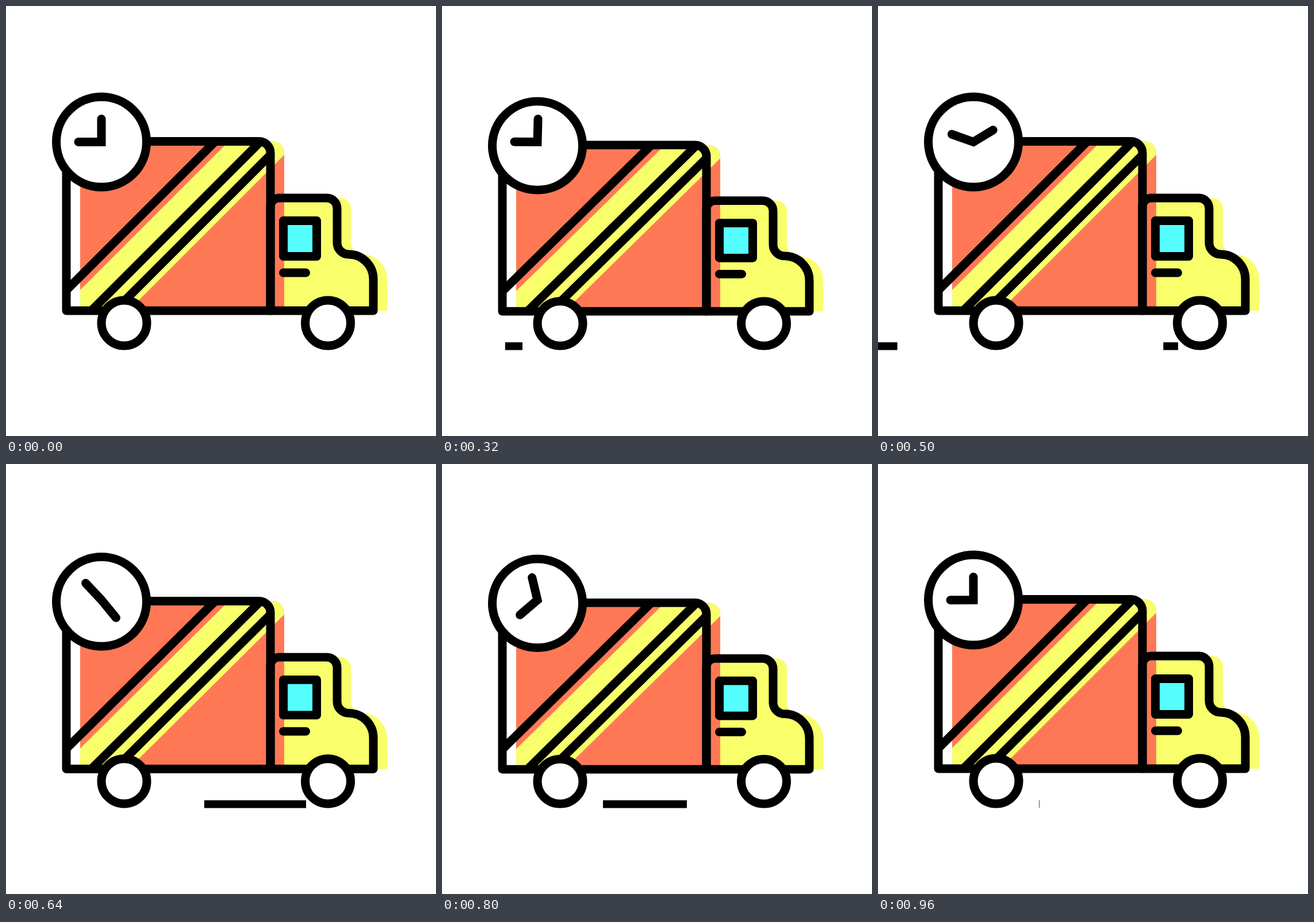
Animation, 748 px wide and 748 px high, one loop 980 ms. Source, as an HTML page:

```html
<!DOCTYPE html>
<html lang="en">
<head>
<meta charset="utf-8">
<title>Delivery truck</title>
<style>
  html, body { margin: 0; width: 100%; height: 100%; overflow: hidden; background: #fff; }
  svg { display: block; width: 100%; height: 100%; }
  .ink { fill: none; stroke: #000; stroke-width: 15; stroke-linejoin: round; }
  .round { stroke-linecap: round; }
  .white { fill: #fff; }
  .orange { fill: #ff7855; }
  .yellow { fill: #f8ff6b; }
  .cyan { fill: #55ffff; }
  #hands { stroke-linejoin: miter; }
</style>
</head>
<body>
<svg viewBox="0 0 748 748">
  <defs>
    <path id="box" d="M105 235.5H440A20 20 0 0 1 460 255.5V530H105Z"/>
    <path id="cab" d="M460 530V349A15 15 0 0 1 475 334H558A18 18 0 0 1 576 352V412A20 20 0 0 0 596 432A43 43 0 0 1 639 475V530Z"/>
    <clipPath id="boxClip"><use href="#box"/></clipPath>
  </defs>

  <rect id="dashBack" y="585" height="13.5"/>
  <rect id="dashMid" y="585" height="13.5"/>

  <g id="truck">
    <g transform="translate(24 0)">
      <use href="#box" class="orange"/>
      <path class="yellow" clip-path="url(#boxClip)" d="M399 200H519L189 530H69Z"/>
      <use href="#cab" class="yellow"/>
    </g>
    <path class="ink" d="M364 235.5L105 494.5M443 235.5L148.5 530M460 259L189 530"/>
    <use href="#box" class="ink"/>
    <use href="#cab" class="ink"/>
    <rect class="ink cyan" style="fill:#55ffff" x="482.5" y="373.5" width="58" height="62"/>
    <path class="ink round" d="M482.5 464H521.5"/>
    <g class="ink" style="fill:#fff">
      <circle cx="205.5" cy="551.5" r="39.5"/>
      <circle cx="560" cy="551.5" r="39.5"/>
      <circle cx="166" cy="236.5" r="78.5"/>
    </g>
  </g>
  <path id="hands" class="ink round"/>
</svg>
<script>
const LOOP = 980, TICK = 20, BOUNCE = 480, GROUND = 598.5;
const el = id => document.getElementById(id);
const truck = el('truck'), hands = el('hands');

const span = (t, from, to) => Math.min(1, Math.max(0, (t - from) / (to - from)));
const smooth = p => (1 - Math.cos(Math.PI * p)) / 2;
const soften = p => p * (1.3 - 0.3 * p);

// Grows leftwards from its right end, then shrinks into its left end.
function dash(node, t, right, length, start, half) {
  const head = right - length * soften(span(t, start, start + half));
  const tail = right - length * soften(span(t, start + half, start + 2 * half));
  node.setAttribute('x', head);
  node.setAttribute('width', tail - head);
}

// Slow squash, quick release.
function squash(t) {
  const p = t % BOUNCE;
  const depth = t < BOUNCE ? 8 : 7.3;
  return depth * smooth(p < 320 ? p / 320 : (BOUNCE - p) / 160);
}

function tip(deg) {
  const a = deg * Math.PI / 180;
  return `${166 + 40 * Math.sin(a)} ${236.5 - 40 * Math.cos(a)}`;
}

function draw(t) {
  const scale = 1 - squash(t) / (GROUND - 150);
  truck.setAttribute('transform', `translate(0 ${GROUND * (1 - scale)}) scale(1 ${scale})`);

  const turn = smooth(span(t, 288, 974));
  hands.setAttribute('d', `M${tip(270 + 90 * turn)}L166 236.5L${tip(270 * turn)}`);

  dash(el('dashBack'), t, 140, 145, 300, 120);
  dash(el('dashMid'), t, 522, 242, 480, 240.5);
}

let origin;
function frame(now) {
  origin ??= now;
  const t = (now - origin) % LOOP;
  draw(Math.floor((t + 0.01) / TICK) * TICK % LOOP);
  requestAnimationFrame(frame);
}
draw(0);
requestAnimationFrame(frame);
</script>
</body>
</html>
```
